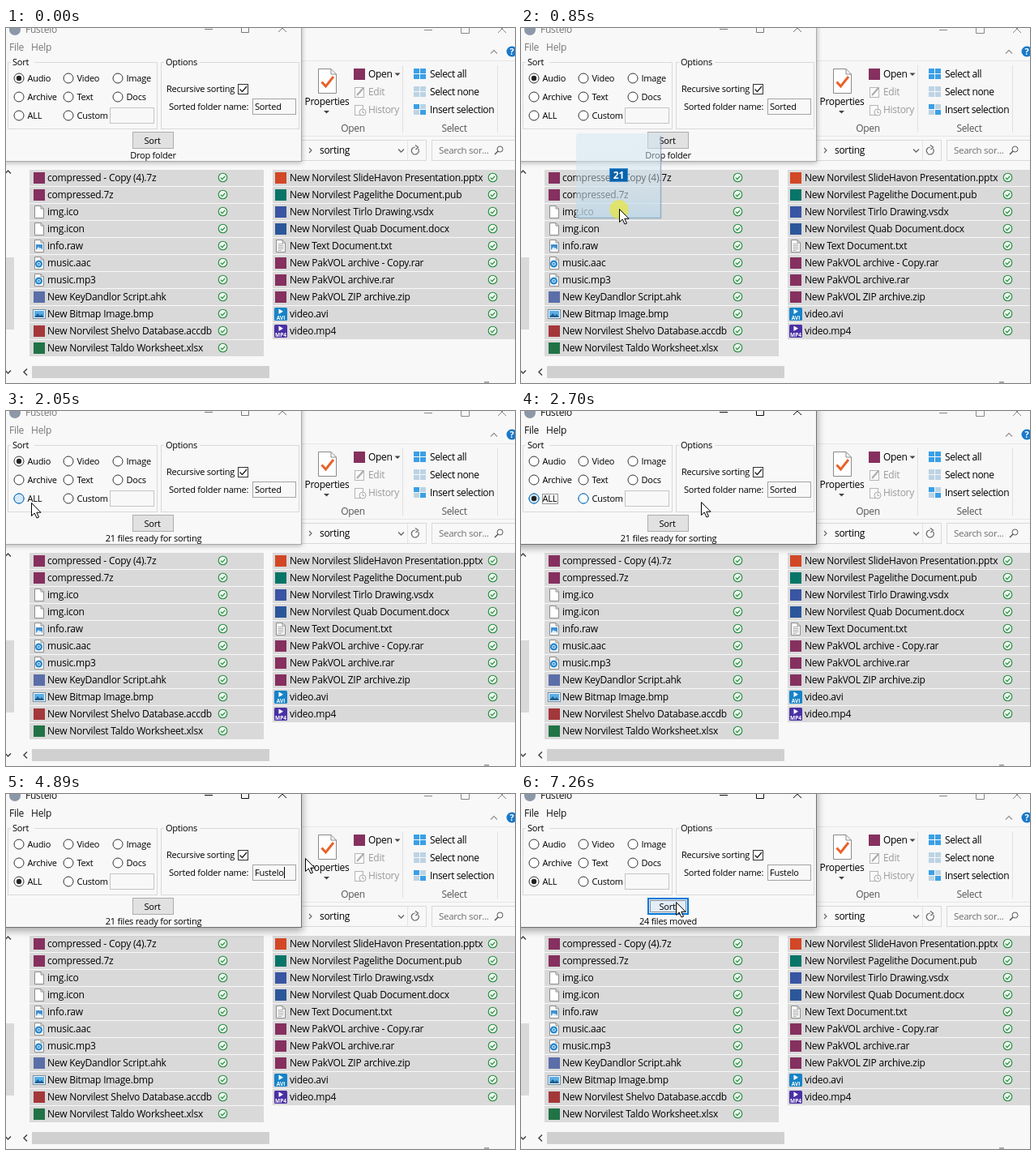
An HTML page that plays this animation: 628x438 px, repeating every 8 s.

```html
<!DOCTYPE html>
<html lang="en">
<head>
<meta charset="utf-8">
<title>File sorter</title>
<style>
html, body { margin: 0; width: 100%; height: 100%; overflow: hidden; background: #f8f8f8; }
svg { display: block; width: 628px; height: 438px; }
text { font-family: "Open Sans", "Noto Sans", sans-serif; font-size: 12px; letter-spacing: -.2px; fill: #000; white-space: pre; }
.ui text { font-size: 11px; letter-spacing: -.22px; }
.ribbon text { letter-spacing: -.3px; }
.ribbon .off { fill: #9a9a9a; }
.mid { text-anchor: middle; }
</style>
</head>
<body>
<svg id="stage" viewBox="0 0 628 438" xmlns="http://www.w3.org/2000/svg"></svg>
<script>
const LOOP = 8000;
const WORD = "Fustelo";
const PAPER = "#f8f8f8";
const stage = document.getElementById("stage");

const text = (x, y, s, attrs = "") => `<text x="${x}" y="${y}" ${attrs}>${s}</text>`;
const rect = (x, y, w, h, fill, attrs = "") => `<rect x="${x}" y="${y}" width="${w}" height="${h}" fill="${fill}" ${attrs}/>`;
const box = (x, y, w, h, fill, stroke, attrs = "") => rect(x + .5, y + .5, w - 1, h - 1, fill, `stroke="${stroke}" ${attrs}`);
const line = (d, stroke = "#444", w = 1) => `<path d="${d}" fill="none" stroke="${stroke}" stroke-width="${w}"/>`;
// Content visible only in the given spans of the loop, "from-to from-to"
const during = (spans, body) => `<g data-on="${spans}">${body}</g>`;

// ---- File icons, each in a 16 x 16 cell ----
const page = `<path d="M2.5 .5H10L13.5 4V15.5H2.5Z" fill="#fff" stroke="#8c8c8c"/><path d="M10 .5V4H13.5" fill="none" stroke="#8c8c8c"/>`;
const tile = color => rect(1, 1, 14, 14, color);
const clip = (color, label) => rect(0, 0, 16, 16, color, 'rx="1.5"') +
  `<path d="M5.5 1.5L11 4.7 5.5 8Z" fill="#fff"/>` +
  text(8, 15, label, 'class="mid" style="font-size:6.5px;font-weight:700;letter-spacing:0;fill:#fff"');
const icons = {
  pack: tile("#85305f"),
  page,
  photo: page + rect(4, 6, 8, 7, "#3e8fd0") + `<path d="M4 13L7 9 9 11 10 10 12 13Z" fill="#dff0fb"/>`,
  audio: page + `<circle cx="7.5" cy="9" r="4.5" fill="#2187d0"/><circle cx="7.5" cy="9" r="1.8" fill="#2187d0" stroke="#fff"/>`,
  script: tile("#5b6ea8"),
  bitmap: box(0, 2, 16, 12, "#fff", "#6d8ca5") + rect(2, 4, 12, 8, "#58aee6") + `<path d="M2 12L6 7 9 10 11 8 14 12Z" fill="#1f5f91"/>`,
  table: tile("#a4373a"),
  sheet: tile("#217346"),
  slide: tile("#d24726"),
  leaf: tile("#077568"),
  draw: tile("#3955a3"),
  doc: tile("#2b579a"),
  note: page + line("M4.5 5.5H11M4.5 7.5H11.5M4.5 9.5H11.5M4.5 11.5H11.5M4.5 13.5H9", "#aaa"),
  avi: clip("#1683c8", "AVI"),
  mp4: clip("#4a30a5", "MP4")
};

const left = [
  ["pack", "compressed - Copy (4).7z"], ["pack", "compressed.7z"],
  ["page", "img.ico"], ["page", "img.icon"], ["photo", "info.raw"],
  ["audio", "music.aac"], ["audio", "music.mp3"],
  ["script", "New KeyDandlor Script.ahk"], ["bitmap", "New Bitmap Image.bmp"],
  ["table", "New Norvilest Shelvo Database.accdb"], ["sheet", "New Norvilest Taldo Worksheet.xlsx"]
];
const right = [
  ["slide", "New Norvilest SlideHavon Presentation.pptx"], ["leaf", "New Norvilest Pagelithe Document.pub"],
  ["draw", "New Norvilest Tirlo Drawing.vsdx"], ["doc", "New Norvilest Quab Document.docx"],
  ["note", "New Text Document.txt"],
  ["pack", "New PakVOL archive - Copy.rar"], ["pack", "New PakVOL archive.rar"], ["pack", "New PakVOL ZIP archive.zip"],
  ["avi", "video.avi"], ["mp4", "video.mp4"]
];
const hover = { 7: "310-530", 6: "530-850" };

function column(files, x, w, iconX, textX, tickX, lit = {}) {
  return files.map(([icon, name], i) => {
    const y = 175 + 21 * i;
    return rect(x, y, w, 20, "#d9d9d9") +
      (lit[i] ? during(lit[i], box(x, y, w, 20, "#cce8ff", "#99d1ff")) : "") +
      `<g transform="translate(${iconX} ${y + 2})">${icons[icon]}</g>` +
      text(textX, y + 14, name) +
      `<g transform="translate(${tickX} ${y + 9.5})"><circle r="5.3" fill="#eef6ef" stroke="#218c3c" stroke-width="1.1"/>${line("M-2.6 .2L-.7 2.1 2.7 -1.7", "#218c3c", 1.2)}</g>`;
  }).join("");
}

function explorer() {
  const grid = (y, colors) => colors.map((c, i) => rect(503 + i % 2 * 8, y + (i >> 1) * 7, 7, 6, c)).join("");
  const blue = "#3a9fe6", pale = "#bcd3e4";
  const choice = (y, label, colors) => grid(y - 11, colors) + text(523, y, label, 'style="letter-spacing:-.38px"');
  const ribbon = rect(365, 41, 263, 92, "#f7f7f7") +
    line("M365 40.5H628M365 133.5H628", "#e6e6e6") + line("M489.5 46V129M606.5 46V129", "#e0e0e0") +
    line("M516 2.5H526M561.5 0V6.5H571.5V0M607 -4L617 6M617 -4L607 6", "#888") +
    line("M598 31.5L602 27.5 606 31.5", "#999", 1.3) +
    `<circle cx="624" cy="29" r="6.5" fill="#1979ca"/>` + text(624, 33, "?", 'class="mid" style="fill:#fff;font-weight:700;font-size:11px"') +
    `<path d="M385.5 50.5H401L407.5 57V80.5H385.5Z" fill="#fff" stroke="#8a8a8a"/>` + line("M401 50.5V57H407.5", "#8a8a8a") +
    line("M389.5 66.5L394.5 72 404 60", "#e8632a", 3) +
    text(396, 95, "Properties", 'class="mid"') + `<path d="M392 102H399L395.5 105.5Z" fill="#444"/>` +
    rect(429, 50, 14, 14, "#85305f") + text(447, 61, "Open") + `<path d="M479.5 55.5H486.5L483 59Z" fill="#444"/>` +
    box(430, 73, 12, 13, "#fafafa", "#b5b5b5") + line("M433 83L441 74", "#aaa", 2) + text(447, 83, "Edit", 'class="off"') +
    box(430, 95, 11, 13, "#fafafa", "#b5b5b5") + `<circle cx="440" cy="104" r="4" fill="#fafafa" stroke="#aaa"/>` + line("M440 101.5V104.5H442", "#aaa") + text(447, 105, "History", 'class="off"') +
    choice(61, "Select all", [blue, blue, blue, blue]) + choice(83, "Select none", [pale, pale, pale, pale]) +
    choice(105, "Insert selection", [blue, pale, pale, blue]) +
    text(428, 128, "Open", 'class="mid" style="fill:#555"') + text(553, 128, "Select", 'class="mid" style="fill:#555"');
  const address = box(350, 138, 169, 26, PAPER, "#d9d9d9") + box(525, 138, 110, 26, PAPER, "#d9d9d9") +
    line("M374 148L377 151 374 154", "#666", 1.2) + text(387, 155, "sorting") +
    line("M484 149.5L487.5 153 491 149.5", "#666", 1.3) + line("M495.5 139V163", "#e4e4e4") +
    line("M508.5 149A4.5 4.5 0 1 1 505 147M505 144.5L508.5 147 505.5 150", "#666", 1.2) +
    text(534, 155, "Search sor...", 'style="font-size:11.5px;fill:#6d6d6d"') +
    `<circle cx="609.5" cy="149.5" r="3.5" fill="none" stroke="#555"/>` + line("M607 152L603 156", "#555", 1.5);
  const bars = rect(0, 283, 10, 89, "#d9d9d9") +
    line("M-1 179.5L2.5 176 6 179.5M-1 422.5L2.5 426 6 422.5", "#444", 1.5) +
    rect(32, 417, 293, 15, "#d0d0d0") + line("M26 420.5L22 424.5 26 428.5", "#444", 1.5) +
    rect(590, 436, 6, 2, "#aaa");
  return `<g class="ribbon">${ribbon}${address}</g>` + bars +
    column(left, 29, 289, 33, 51, 267.5, hover) + column(right, 329, 299, 331, 350, 600.5);
}

function radio(x, y, label) {
  return `<circle cx="${x}" cy="${y}" r="6" fill="#fff" stroke="#333"/>` + text(x + 10.5, y + 4, label);
}
const dot = (x, y) => `<circle cx="${x}" cy="${y}" r="3.2" fill="#222"/>`;
const ring = (x, y, fill) => `<circle cx="${x}" cy="${y}" r="6" fill="${fill}" stroke="#0078d7"/>`;
const group = (x, w, label, labelW) => box(x, 42, w, 83, "none", "#d9d9d9") + rect(x + 4, 40, labelW, 5, PAPER) + text(x + 6, 46, label);

function app() {
  const idle = "0-2160", active = "2160-8000";
  const frame = (edge, shadow) => rect(-10, -10, 375, 175, edge, `style="filter:drop-shadow(${shadow})"`);
  const heading = color => text(24, 6, WORD, `style="font-size:12px;fill:${color}"`) +
    text(4, 28, "File", `style="font-size:12px;fill:${color}"`) + text(31, 28, "Help", `style="font-size:12px;fill:${color}"`) +
    line("M245 1.5H255M290.5 -4V5.5H299.5V-4M336 -5L346 5M346 -5L336 5", color);
  const button = (fill, edge, extra = "") => box(156, 128, 51, 21, fill, edge, extra);
  const focus = (x, y, w, h) => box(x, y, w, h, "none", "#333", 'stroke-dasharray="1 1"');
  return during(idle, frame("#aaa", "0 1px 3px rgba(0,0,0,.3)")) +
    during(active, frame("#707070", "1px 4px 5px rgba(0,0,0,.32)")) +
    rect(0, 0, 364, 164, PAPER) +
    `<circle cx="11" cy="2" r="7" fill="#8c98a8"/>` +
    during(idle, heading("#777")) + during(active, heading("#111")) +
    group(2, 185, "Sort", 29) + group(191, 171, "Options", 44) +
    radio(16, 62, "Audio") + radio(77, 62, "Video") + radio(138, 62, "Image") +
    radio(16, 85, "Archive") + radio(77, 85, "Text") + radio(138, 85, "Docs") +
    radio(16, 108, "ALL") + radio(77, 108, "Custom") +
    during("2050-2810", ring(16, 108, "#d6e9f8")) + during("2590-2810", ring(77, 108, "#fff")) +
    during(idle, dot(16, 62)) + during(active, dot(16, 108)) + during("2160-2920", focus(26, 102, 20, 13)) +
    box(128, 98, 55, 20, PAPER, "#c4c4c4") +
    text(198, 79, "Recursive sorting") + box(286, 69, 13, 13, "#fff", "#333") + line("M288.5 75.5L291.5 78.5 297 72", "#222", 1.4) +
    text(201, 101, "Sorted folder name:") +
    box(304, 87, 54, 20, PAPER, "#a4a4a4") +
    during("0-3130", text(307, 101, "Sorted")) +
    during("3130-3680", rect(307, 90, 34, 14, "#0078d7") + text(307, 101, "Sorted", 'style="fill:#fff"')) +
    text(307, 101, "", 'id="typed"') + during("3790-5430 5870-6410", `<rect id="caret" y="90" width="1" height="14" fill="#000"/>`) +
    during("0-6300", button("#e1e1e1", "#adadad")) + during("6300-6620", button("#dce8f3", "#5a8fbd")) +
    during("6620-7050", button("#cce4f7", "#005499")) +
    during("7050-8000", button("#e3eef8", "#0078d7") + box(157, 129, 49, 19, "none", "#0078d7")) +
    during("6620-8000", focus(159, 131, 45, 15)) +
    text(180.5, 142.5, "Sort", 'class="mid"') +
    during("0-1500", text(181.5, 161, "Drop folder", 'class="mid"')) +
    during("1500-7150", text(182, 161, "21 files ready for sorting", 'class="mid"')) +
    during("7150-8000", text(181.5, 161, "24 files moved", 'class="mid"'));
}

// Everything that follows the pointer; 0,0 is its tip
function pointer() {
  return during("640-1500",
      rect(-53, -93, 105, 105, "url(#glass)", 'rx="3"') +
      line("M51.5 -90V11.5H-51", "rgba(110,150,175,.6)", 1.5) +
      box(-12, -50, 23, 17, "#0a63ad", "#3d8fd0") +
      text(-.5, -37, "21", 'class="mid" style="font-weight:700;letter-spacing:0;fill:#fff"')) +
    during("530-1500 2160-2370 2920-3460 6620-6830", `<circle cy="1" r="11.7" fill="#ebe632" opacity=".68"/>`) +
    during("1070-1500",
      box(10, 13, 57, 20, "#fff", "#8c8c8c") + line("M14 23H25M20.5 18.5L25 23 20.5 27.5", "#1f5fe0", 1.3) +
      text(30, 27, "Move", 'style="fill:#1c3f9c"')) +
    during("2920-3350", line("M-3 -8H-1L0 -7 1 -8H3M0 -7V7M-3 8H-1L0 7 1 8H3", "#000")) +
    during("310-2920 3350-8000", `<path d="M.5 .5V16.5L4.2 13 7 19 9.5 18 6.8 12.2H12Z" fill="#fff" stroke="#000"/>`);
}

stage.innerHTML = `<defs><linearGradient id="glass" x2="0" y2="1">
  <stop offset="0" stop-color="#cfe6f2" stop-opacity=".5"/><stop offset=".6" stop-color="#cbe2ef" stop-opacity=".5"/>
  <stop offset="1" stop-color="#bcd8e8" stop-opacity=".8"/></linearGradient></defs>` +
  rect(0, 0, 628, 438, PAPER) + explorer() + `<g class="ui">${app()}</g><g id="pointer">${pointer()}</g>`;

// Pointer path: time, x, y
const path = [
  [310, 188, 341], [420, 181, 323], [530, 179, 313], [640, 174, 301], [750, 151, 263], [850, 121, 223],
  [960, 95, 186], [1070, 79, 158], [1180, 79, 152], [1290, 79, 148],
  [1830, 73, 140], [1940, 50, 124], [2050, 31, 113], [2160, 20, 109], [2370, 27, 109],
  [2480, 72, 109], [2590, 150, 111], [2700, 222, 112],
  [2810, 275, 107], [2920, 308, 97], [3020, 318, 94], [3130, 333, 86], [3240, 350, 70], [3350, 364, 72], [3460, 369, 79],
  [5870, 253, 108], [5980, 233, 121], [6090, 214, 131], [6300, 200, 132], [6410, 196, 132], [6520, 193, 132], [6620, 191, 133]
];
const keys = [3680, 4010, 4340, 4450, 4560, 4780, 4890];

const mover = document.getElementById("pointer");
const typed = document.getElementById("typed");
const caret = document.getElementById("caret");
const timed = [...stage.querySelectorAll("[data-on]")].map(el => ({
  el, spans: el.dataset.on.split(" ").map(s => s.split("-").map(Number))
}));

function draw(t) {
  for (const { el, spans } of timed) {
    el.style.display = spans.some(([a, b]) => t >= a && t < b) ? "" : "none";
  }
  let at = path[0];
  for (const step of path) if (step[0] <= t) at = step;
  mover.setAttribute("transform", `translate(${at[1]} ${at[2]})`);
  const word = WORD.slice(0, keys.filter(k => k <= t).length);
  if (typed.textContent !== word) {
    typed.textContent = word;
    caret.setAttribute("x", 307 + Math.ceil(word ? typed.getComputedTextLength() : 0));
  }
}

const start = performance.now();
function tick() {
  draw((performance.now() - start) % LOOP);
  requestAnimationFrame(tick);
}
tick();
</script>
</body>
</html>
```
